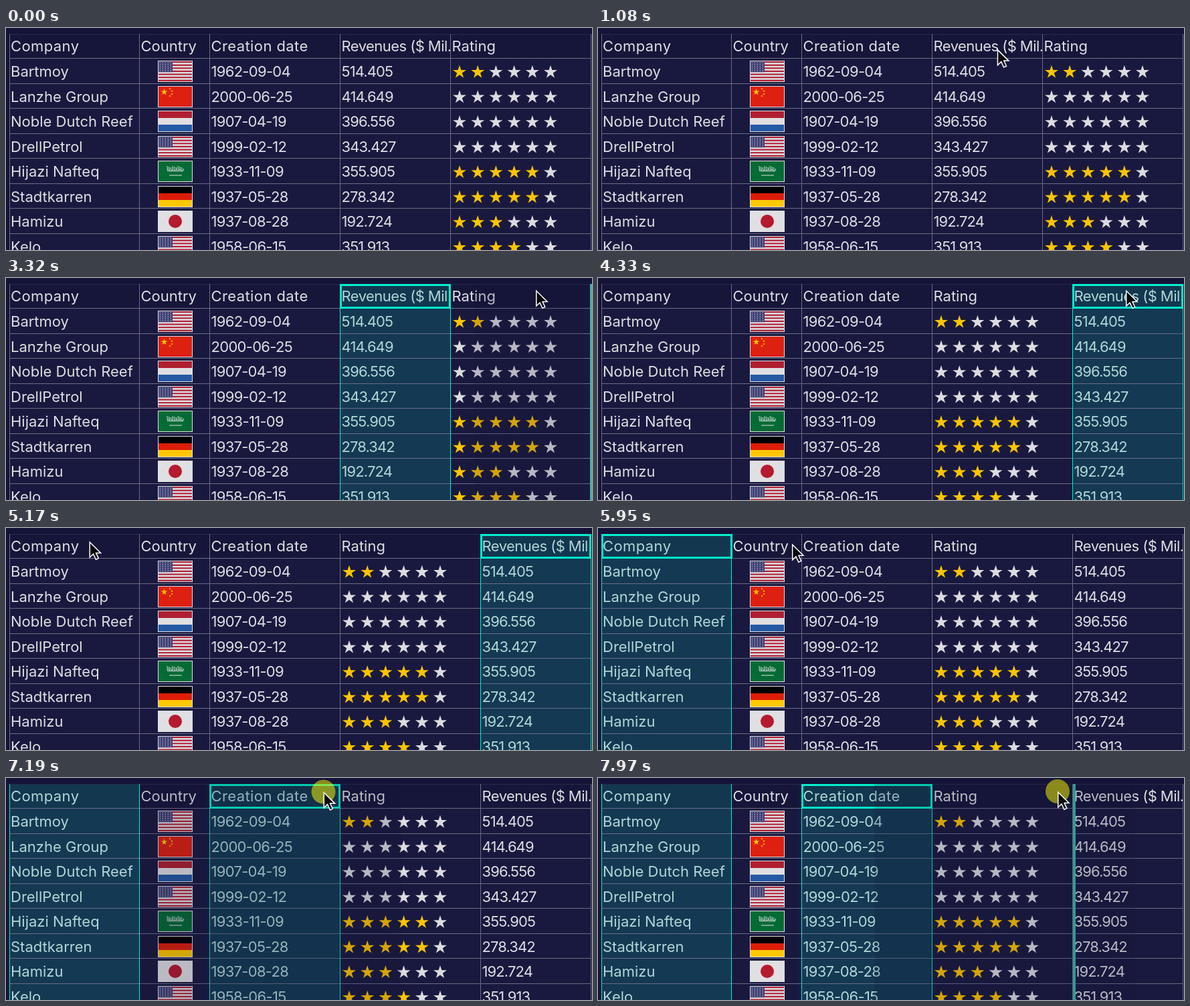
An HTML page with a canvas that plays this animation: 876x333 px, repeating every 8000 ms.

```html
<!DOCTYPE html>
<html lang="en">
<head>
<meta charset="utf-8">
<title>Column reordering</title>
<style>
html, body { margin: 0; width: 100%; height: 100%; overflow: hidden; background: #141439; }
canvas { display: block; }
</style>
</head>
<body>
<canvas id="stage" width="876" height="333"></canvas>
<script>
const ctx = document.getElementById('stage').getContext('2d');
const LOOP = 8000, STEP = 77.4;
const TOP = 9, HEAD = 45, ROW = 37.55, BOTTOM = 334;
const ACCENT = '#00f2cc', LINE = '#6c6c86', TEXT = '#dedee2', WHITE = '#e0dfe2', GOLD = '#ffc400';

const rows = [
  ['Bartmoy', 'us', '1962-09-04', '514.405', 2],
  ['Lanzhe Group', 'cn', '2000-06-25', '414.649', 0],
  ['Noble Dutch Reef', 'nl', '1907-04-19', '396.556', 0],
  ['DrellPetrol', 'us', '1999-02-12', '343.427', 0],
  ['Hijazi Nafteq', 'sa', '1933-11-09', '355.905', 5],
  ['Stadtkarren', 'de', '1937-05-28', '278.342', 5],
  ['Hamizu', 'jp', '1937-08-28', '192.724', 3],
  ['Kelo', 'us', '1958-06-15', '351.913', 4]
];
const titles = ['Company', 'Country', 'Creation date', 'Revenues ($ Mil.)', 'Rating'];
const titleGap = [0.4, 0, 0.4, -0.55, 0];
const cellGap = [0, 0, -0.7, -0.9, 0];
const widths = [194.5, 105, 195, 165, 210];

// Pointer moves: start, end, x, y, sag of the path
const moves = [
  [290, 1160, 594, 25, 0],
  [2080, 2085, 592, 24, 0],
  [2210, 3080, 792, 18, 0],
  [4300, 5170, 124.5, 20, 3],
  [5620, 6190, 382, 21, 3.5],
  [6880, 7750, 687, 20, 0]
];
const presses = [[1385, 1470], [2230, 3315], [5335, 5415], [6255, 6565], [6890, LOOP]];

function pointer(t) {
  let x = 720, y = 333;
  for (const [start, end, toX, toY, sag] of moves) {
    if (t < start) break;
    const p = Math.min(1, (t - start) / (end - start));
    const e = p * p * (3 - 2 * p);
    x += (toX - x) * e;
    y += (toY - y) * e + sag * 4 * e * (1 - e);
  }
  return { x, y };
}

function box(x, y, w, h, color) {
  ctx.fillStyle = color;
  ctx.fillRect(x, y, w, h);
}

function disc(x, y, r, color) {
  ctx.fillStyle = color;
  ctx.beginPath();
  ctx.arc(x, y, r, 0, 2 * Math.PI);
  ctx.fill();
}

function star(x, y, r, color) {
  ctx.fillStyle = color;
  ctx.beginPath();
  for (let i = 0; i < 10; i++) {
    const a = i * Math.PI / 5 - Math.PI / 2, d = i % 2 ? r * 0.382 : r;
    ctx.lineTo(x + d * Math.cos(a), y + d * Math.sin(a));
  }
  ctx.fill();
}

function label(text, x, y, gap) {
  ctx.font = '22px Inter, sans-serif';
  ctx.letterSpacing = gap + 'px';
  ctx.fillStyle = TEXT;
  ctx.fillText(text, x, y);
}

const bands = colors => colors.forEach((c, i) => {
  const h = 30 / colors.length;
  box(0, i * h, 50, h, c);
});

const flags = {
  us() {
    bands(Array.from({ length: 13 }, (_, i) => i % 2 ? WHITE : '#b02339'));
    box(0, 0, 21, 16.2, '#3f3f73');
    for (let i = 0; i < 25; i++) disc(2.3 + i % 5 * 4, 2 + Math.floor(i / 5) * 3, 0.75, '#c8c8d8');
  },
  cn() {
    bands(['#de2010']);
    star(8.5, 8, 5, '#ffd000');
    [[17, 3], [20, 6.5], [20, 11], [17, 14]].forEach(([x, y]) => star(x, y, 1.8, '#ffd000'));
  },
  nl() { bands(['#b01f30', WHITE, '#2459a5']); },
  de() { bands(['#000', '#dd1d08', '#ffc800']); },
  jp() {
    bands([WHITE]);
    disc(25, 15, 10, '#b51a2e');
  },
  sa() {
    bands(['#046b35']);
    ctx.strokeStyle = WHITE;
    ctx.lineWidth = 1;
    ctx.beginPath();
    for (let i = 0; i < 9; i++) {
      const x = 13 + i * 2.7;
      ctx.moveTo(x, 7 + i % 3);
      ctx.lineTo(x + 0.5, 14);
      ctx.quadraticCurveTo(x + 2, 17, x + 3, 11 + i % 2 * 2);
    }
    ctx.moveTo(16, 21);
    ctx.lineTo(35, 21);
    ctx.stroke();
  }
};

function flag(kind, x, y) {
  box(x, y, 52, 32, WHITE);
  ctx.save();
  ctx.translate(x + 1, y + 1);
  flags[kind]();
  ctx.restore();
}

function column(id, x, selected, focused) {
  const w = widths[id];
  ctx.save();
  ctx.beginPath();
  ctx.rect(x, TOP, w - (focused ? 3 : 0), HEAD - TOP);
  ctx.clip();
  label(titles[id], x + 2, 35, titleGap[id]);
  ctx.restore();
  rows.forEach((row, i) => {
    const mid = HEAD + ROW * (i + 0.5) + 1.2;
    if (id === 1) flag(row[1], Math.round(x + 27.5), Math.round(mid - 16));
    else if (id === 4) {
      for (let k = 0; k < 6; k++) star(x + 13.5 + k * 27.2, mid + 1.3, 10.5, k < row[4] ? GOLD : '#dcdce0');
    } else label(row[id], x + 2, Math.round(mid + 8), cellGap[id]);
  });
  if (selected) box(x, TOP, w, BOTTOM - TOP, 'rgba(0,184,163,.2)');
}

function arrow(x, y) {
  ctx.save();
  ctx.translate(x, y);
  ctx.scale(1.5, 1.5);
  ctx.beginPath();
  [[0.5, 0.8], [0.5, 16], [4, 12.6], [6.6, 18.2], [9.2, 17], [6.7, 11.6], [11.4, 11.6]]
    .forEach(([px, py]) => ctx.lineTo(px, py));
  ctx.closePath();
  ctx.fillStyle = '#050508';
  ctx.fill();
  ctx.strokeStyle = '#fff';
  ctx.lineWidth = 1;
  ctx.stroke();
  ctx.restore();
}

function draw(t) {
  const { x: px, y: py } = pointer(t);
  const order = t < 3465 ? [0, 1, 2, 3, 4] : [0, 1, 2, 4, 3];
  const focus = t < 1385 ? -1 : t < 5335 ? 3 : t < 6255 ? 0 : 2;
  const selected = focus < 0 ? [] : focus === 2 ? [0, 2] : [focus];
  const left = [];
  order.reduce((x, id) => (left[id] = x, x + widths[id]), 5);

  box(0, 0, 876, 333, '#141439');
  box(5, TOP, 870, HEAD - TOP, '#16163a');
  box(5, HEAD, 870, BOTTOM, '#19193f');
  order.forEach(id => column(id, left[id], selected.includes(id), id === focus));

  // Grid
  box(5, TOP, 870, 1, '#29294b');
  for (let i = 0; i < 8; i++) box(5, Math.round(HEAD + i * ROW), 870, 1, LINE);
  [...order.map(id => left[id]), 874].forEach(x => box(Math.floor(x), TOP, 1, BOTTOM, LINE));
  selected.forEach(id => {
    [left[id], Math.min(874, left[id] + widths[id])].forEach(x => box(Math.floor(x), TOP, 1, BOTTOM, ACCENT));
  });
  if (focus >= 0) {
    ctx.strokeStyle = ACCENT;
    ctx.lineWidth = 3;
    ctx.strokeRect(Math.floor(left[focus]) + 1.5, TOP + 1.5, Math.round(widths[focus]) - 2, HEAD - TOP - 2);
  }

  // Drop marker and drag shade
  const firstDrag = t >= 2230 && t < 3465;
  if (firstDrag || t >= 6890) {
    const middle = left[4] + widths[4] / 2;
    if (px > middle) box(Math.min(873, Math.round(left[4] + widths[4])), TOP, 4, BOTTOM, '#3ab8a8');
    const [grab, width] = firstDrag ? [93, 165] : [274, 390];
    box(px - grab, TOP, width, BOTTOM, 'rgba(18,20,52,.18)');
  }

  if (presses.some(([a, b]) => t >= a && t < b)) disc(px, py, 18, 'rgba(255,255,0,.5)');
  if (t >= 290) arrow(px, py);
}

function frame() {
  const t = performance.now() % LOOP;
  draw(Math.floor(t / STEP + 0.2) * STEP);
  requestAnimationFrame(frame);
}
frame();
</script>
</body>
</html>
```
